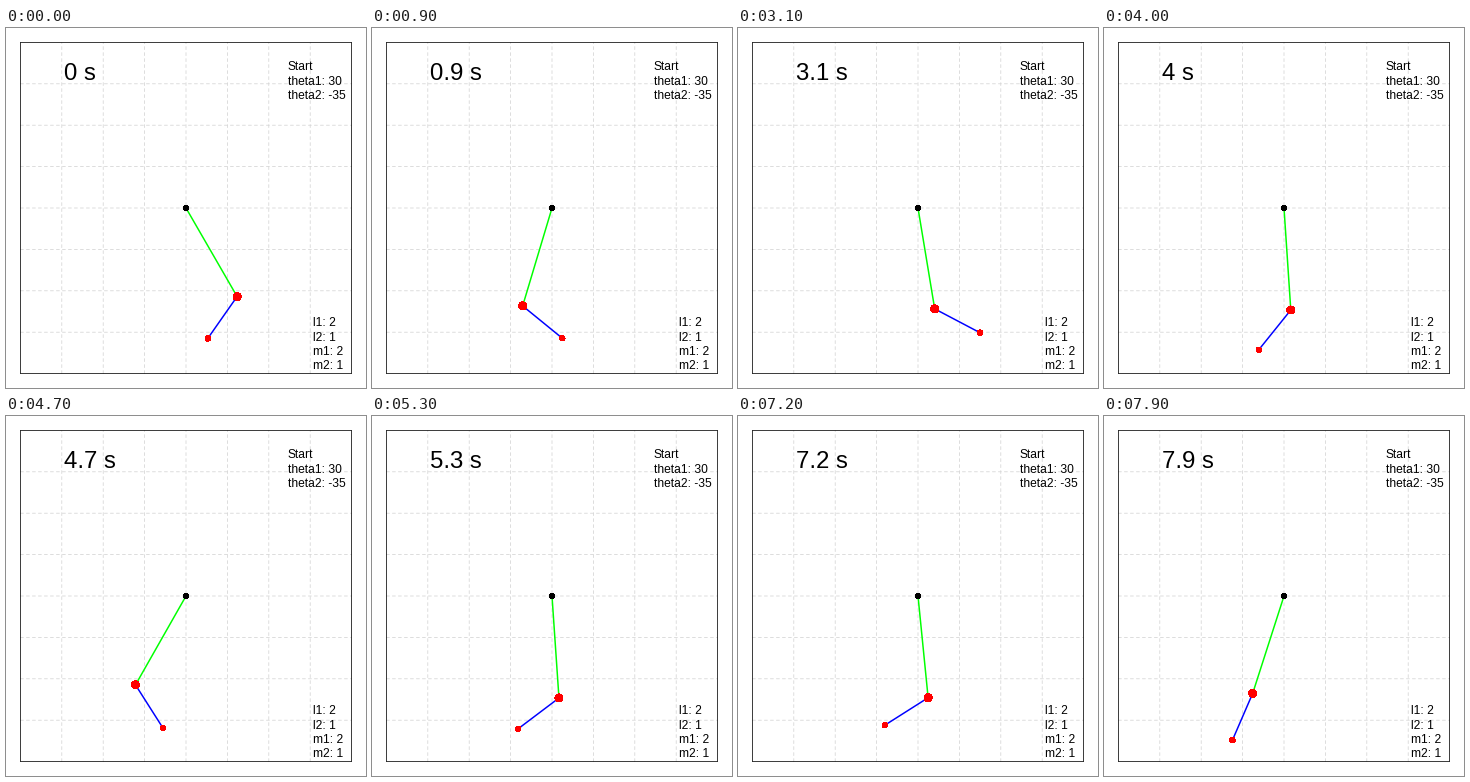
These frames come from a looping animation (360 by 360 pixels, 8000 ms). A matplotlib script:

```python
import numpy as np
import matplotlib.pyplot as plt
from matplotlib.animation import FuncAnimation
from matplotlib.patches import Circle, Rectangle

SIZE, MARGIN = 360, 14.4
FRAMES, STEP_MS = 80, 100
MID = SIZE / 2
INNER = SIZE - 2 * MARGIN
UNIT = INNER / 6.48          # pixels per metre

G = 9.81
L1, L2 = 2, 1
M1, M2 = 2, 1
START = (30, -35)            # degrees

plt.rcParams["font.family"] = "Liberation Sans"


def derivative(state):
    a1, a2, w1, w2 = state
    s, c = np.sin(a1 - a2), np.cos(a1 - a2)
    mass = [[(M1 + M2) * L1, M2 * L2 * c],
            [L1 * c, L2]]
    force = [-M2 * L2 * w2 ** 2 * s - (M1 + M2) * G * np.sin(a1),
             L1 * w1 ** 2 * s - G * np.sin(a2)]
    acc = np.linalg.solve(mass, force)
    return np.array([w1, w2, acc[0], acc[1]])


def rk4(state, h):
    k1 = derivative(state)
    k2 = derivative(state + h / 2 * k1)
    k3 = derivative(state + h / 2 * k2)
    k4 = derivative(state + h * k3)
    return state + h / 6 * (k1 + 2 * k2 + 2 * k3 + k4)


def simulate(substeps=20):
    state = np.array([*np.radians(START), 0, 0])
    angles = []
    for _ in range(FRAMES):
        angles.append(state[:2])
        for _ in range(substeps):
            state = rk4(state, STEP_MS / 1000 / substeps)
    return np.array(angles)


def polar(origin, length, angle):
    return (origin[0] + UNIT * length * np.sin(angle),
            origin[1] + UNIT * length * np.cos(angle))


fig = plt.figure(figsize=(SIZE / 72, SIZE / 72), dpi=72, facecolor="white")
ax = fig.add_axes([0, 0, 1, 1])
ax.set_xlim(0, SIZE)
ax.set_ylim(SIZE, 0)
ax.axis("off")


def rod(color):
    return ax.plot([], [], color=color, lw=1.5, snap=False, zorder=3,
                   solid_capstyle="round")[0]


def ball(radius, color, zorder):
    # Discs have hard pixel edges, unlike the lines.
    return ax.add_patch(Circle((MID, MID), radius, fc=color, lw=0,
                               antialiased=False, zorder=zorder))


def column(x, y, lines):
    for i, line in enumerate(lines):
        ax.text(x, y + 14.4 * i, line, size=12, va="baseline")


ends = [MARGIN, SIZE - MARGIN]
grid = dict(color="lightgray", lw=0.75, ls=(0, (4, 4)),
            dash_capstyle="round", snap=False, zorder=1)
for k in range(1, 8):
    at = [MARGIN + INNER * k / 8] * 2
    ax.plot(at, ends[::-1], **grid)
    ax.plot(ends, at, **grid)
ax.add_patch(Rectangle((MARGIN, MARGIN), INNER, INNER, fill=False,
                       ec="black", lw=0.75, snap=False, zorder=2))

column(282, 42.2, ["Start", f"theta1: {START[0]}", f"theta2: {START[1]}"])
column(307, 298.2, [f"l1: {L1}", f"l2: {L2}", f"m1: {M1}", f"m2: {M2}"])
clock = ax.text(57.9, 52, "", size=24, va="baseline")

upper, lower = rod("#00ff00"), rod("#0000ff")
ball(2.75, "black", 4)
bob1 = ball(4, "red", 5)
bob2 = ball(2.75, "red", 5)

poses = simulate()


def draw(i):
    a1, a2 = poses[i]
    pivot = (MID, MID)
    p1 = polar(pivot, L1, a1)
    p2 = polar(p1, L2, a2)
    upper.set_data(*zip(pivot, p1))
    lower.set_data(*zip(p1, p2))
    bob1.center, bob2.center = p1, p2
    clock.set_text(f"{i * STEP_MS / 1000:g} s")
    return upper, lower, bob1, bob2, clock


anim = FuncAnimation(fig, draw, frames=FRAMES, interval=STEP_MS,
                     repeat=True, repeat_delay=0, blit=False)
plt.show()
```
